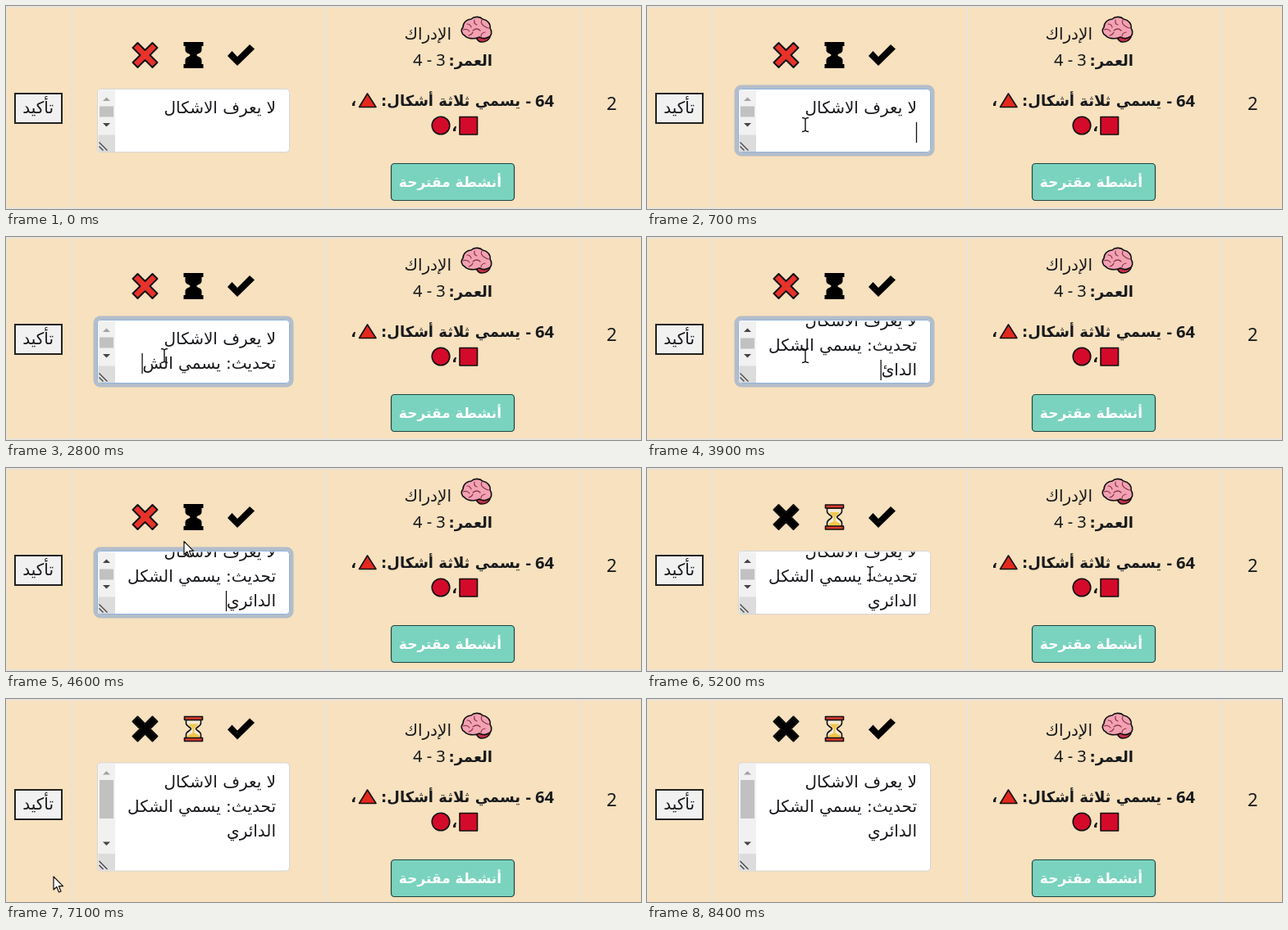
These frames come from a looping animation (774 by 248 pixels, 8500 ms). An HTML page:

```html
<!DOCTYPE html>
<html lang="ar">
<head>
<meta charset="utf-8">
<title>تحديث الملاحظة</title>
<style>
html, body { margin: 0; width: 100%; height: 100%; overflow: hidden; background: #f7e1be; }
svg { display: block; }
text { font: 20px 'Noto Sans', 'DejaVu Sans', sans-serif; fill: #17191c; white-space: pre; }
.ar { font-family: 'DejaVu Sans', sans-serif; direction: rtl; }
.bold { font-weight: bold; }
.grid { fill: none; stroke: #e9e3da; stroke-width: 2; }
.ink { stroke: #111; stroke-width: 1.6; stroke-linejoin: round; stroke-linecap: round; }
.cursor { fill: #fff; stroke: #111; stroke-width: 1.2; stroke-linejoin: round; }
</style>
</head>
<body>
<svg width="774" height="248" viewBox="0 0 774 248">
  <defs>
    <clipPath id="clip"><rect id="clipBox" x="134" width="211"/></clipPath>
  </defs>
  <rect width="774" height="248" fill="#f7e1be"/>
  <path class="grid" d="M0 1H774M0 0V248M80 0V248M390 0V248M700 0V248"/>
  <path class="grid" id="floor" d="M0 247H774"/>

  <g id="row">
    <rect x="11" y="107" width="57" height="36" fill="#f1f1f1" stroke="#222" stroke-width="2"/>
    <text class="ar" x="58" y="131">تأكيد</text>

    <g class="ink">
      <path fill="#c5304a" d="M573 38C578 36 588 35 590 38C588 42 584 44 580 44C576 44 574 41 573 38Z"/>
      <path fill="#f3a2b3" d="M559 36C555 34 554 29 557 26C557 20 562 16 567 16C571 12 578 13 581 16C587 17 591 22 590 27C593 31 592 37 588 38C584 41 579 39 577 38C571 41 562 40 559 36Z"/>
      <path fill="none" stroke="#8d3a4c" stroke-width="1.2" d="M562 22q4 0 5 4M557 29q5-2 8 2M571 17q-1 5 3 6M580 17q-2 4 2 7t7 3M569 30q5-4 9 0M564 36q4-1 5-4M579 37q0-4 5-5"/>
    </g>
    <text class="ar" x="543" y="41">الإدراك</text>
    <text class="ar bold" x="593" y="73" style="font-size:18px">العمر:</text>
    <text x="496" y="73">4 - 3</text>

    <text class="bold" x="668" y="123" text-anchor="end">- 64</text>
    <text class="ar bold" x="627" y="122" style="font-size:18px">يسمي ثلاثة أشكال:</text>
    <path class="ink" fill="#e4281d" d="M440.500 107L451 123.500H430.500Z"/>
    <text class="ar bold" x="427" y="122" style="font-size:18px">،</text>
    <rect class="ink" x="553" y="135.500" width="21.500" height="21.500" fill="#d40a2a"/>
    <text class="ar bold" x="550" y="153" style="font-size:18px">،</text>
    <circle class="ink" cx="530" cy="146" r="10.800" fill="#d40a2a"/>

    <rect x="469.500" y="192.500" width="150" height="45" rx="4" fill="#7ad3bf" stroke="#20443e" stroke-width="1.200"/>
    <text class="ar bold" x="604" y="221" style="font-size:17px;fill:#fff">أنشطة مقترحة</text>
    <text x="732" y="127" style="font-size:22px">2</text>
  </g>

  <g id="icons">
    <path id="cross" class="ink" transform="translate(169.500 0)" style="stroke-width:2"
      d="M-15-9L-9-15L0-6L9-15L15-9L6 0L15 9L9 15L0 6L-9 15L-15 9L-6 0Z"/>
    <g transform="translate(228.500 0)">
      <path id="glassDark" fill="#000" d="M-12-16H12V-11H10V-6C10-2 4-2 4 0C4 2 10 2 10 6V11H12V16H-12V11H-10V6C-10 2-4 2-4 0C-4-2-10-2-10-6V-11H-12Z"/>
      <g id="glassLit" class="ink">
        <path fill="#f5ead4" d="M-9-11V-7C-9-3-3-2-3 0C-3 2-9 3-9 7V11H9V7C9 3 3 2 3 0C3-2 9-3 9-7V-11Z"/>
        <path fill="#f2c84b" stroke="none" d="M-6-6H6C5-3 1-2 1 1V5L7 8V11H-7V8L-1 5V1C-1-2-5-3-6-6Z"/>
        <path fill="#dc3a2d" d="M-11-15H11V-11H-11ZM-11 11H11V15H-11Z"/>
      </g>
    </g>
    <path fill="#000" d="M270 1L275.500-5L282 2L297-13L303-7.500L282 13Z"/>
  </g>

  <rect id="ring" x="109" width="239" rx="6" fill="none" stroke="#b3bdca" stroke-width="5"/>
  <rect id="box" x="111.500" width="234" rx="4" fill="#fff"/>
  <rect id="track" x="112.500" width="20.500" fill="#f1f1f1"/>
  <rect id="thumb" x="114" width="17" fill="#c1c1c1"/>
  <path id="up" d="M118 2.500L122.500-2L127 2.500Z"/>
  <path id="down" fill="#444" d="M118-2.500L122.500 2L127-2.500Z"/>
  <g id="corner">
    <rect x="112.500" y="-21" width="20.500" height="20.500" fill="#dcdcdc"/>
    <path d="M113.500-12L123.500-2M113.500-7L118.500-2" stroke="#444" stroke-width="1.300"/>
  </g>
  <g clip-path="url(#clip)">
    <g id="note"></g>
    <path id="caret" d="M0-19V6" stroke="#111" stroke-width="1.300"/>
  </g>

  <path id="beam" d="M-4-8.500Q-1-8.500 0-7Q1-8.500 4-8.500M0-7V7M-4 8.500Q-1 8.500 0 7Q1 8.500 4 8.500" fill="none" stroke="#111" stroke-width="1.400"/>
  <path id="resize" class="cursor" d="M0-11L4.500-6H1.500V6H4.500L0 11L-4.500 6H-1.500V-6H-4.500Z"/>
  <path id="arrow" class="cursor" d="M0 0V16L3.800 12.500L6.500 19L9 18L6.400 11.700H11.500Z"/>
</svg>
<script>
const LOOP = 8500, STEP = 100;
const FIRST = 'لا يعرف الاشكال', SECOND = 'تحديث: يسمي الشكل ', THIRD = 'الدائري';
const CLICK_NOTE = 400, TYPE_START = 500, TYPE_STEP = 141, CLICK_GLASS = 4800;
const DRAG_START = 5500, DRAG_END = 6000, SCROLL_BACK = 6200;
const RIGHT = 329, LINE = 30, CONTENT = 194, SLACK = 47;

// time, x, y of the pointer
const PATH = [
  [100, 300, 246], [400, 193, 145], [4400, 193, 145], [4700, 229, 62],
  [4900, 229, 62], [5200, 272, 129], [5500, 128, 184.5], [6000, 128, 216],
  [6100, 150, 190], [6200, 150, 190], [6300, 58, 217], [7300, 58, 217]
];

const $ = id => document.getElementById(id);
const set = (node, attrs) => { for (const k in attrs) node.setAttribute(k, attrs[k]); };
const show = (id, on) => $(id).setAttribute('visibility', on ? 'visible' : 'hidden');
const move = (id, x, y) => $(id).setAttribute('transform', `translate(${x} ${y})`);
const mix = (a, b, p) => a + (b - a) * p;
const clamp = (v, lo, hi) => Math.max(lo, Math.min(hi, v));

const lines = [0, 1, 2].map(() => {
  const el = document.createElementNS('http://www.w3.org/2000/svg', 'text');
  set(el, { class: 'ar', x: RIGHT });
  return $('note').appendChild(el);
});

function pointerAt(t) {
  const i = PATH.findIndex(k => k[0] > t);
  if (i < 1) return null;
  const [a, b] = [PATH[i - 1], PATH[i]];
  const p = (t - a[0]) / (b[0] - a[0]);
  return { x: mix(a[1], b[1], p), y: mix(a[2], b[2], p) };
}

function heightAt(t) {
  if (t <= 5900) return mix(77, 126, clamp((t - DRAG_START) / 400, 0, 1));
  return mix(126, 132, clamp((t - 5900) / 100, 0, 1));
}

function noteLines(t) {
  const n = Math.floor((t - TYPE_START) / TYPE_STEP);
  const tail = (SECOND + THIRD).slice(0, clamp(n - 1, 0, 99));
  const wraps = tail.length > SECOND.length + 1;
  return {
    rows: wraps ? [FIRST, SECOND, tail.slice(SECOND.length)] : [FIRST, tail, ''],
    last: wraps ? 2 : n > 0 ? 1 : 0
  };
}

function drawNote(t, top, scroll, focus, { rows, last }) {
  lines.forEach((el, i) => {
    el.textContent = rows[i];
    el.setAttribute('y', top + 29.5 + LINE * i - scroll);
  });
  const width = rows[last] ? lines[last].getComputedTextLength() : 0;
  move('caret', RIGHT - width - 0.5, top + 29.5 + LINE * last - scroll);
  show('caret', focus);
}

function drawBox(top, height, scroll, focus) {
  const bottom = top + height, track = height - 63;
  const size = Math.max(13, track * height / CONTENT);
  const pos = Math.min(track - size, track * scroll / CONTENT);
  set($('box'), { y: top, height, stroke: focus ? '#8fb3dc' : '#d3d5d6' });
  set($('ring'), { y: top - 2.5, height: height + 5 });
  show('ring', focus);
  set($('track'), { y: top + 1, height: height - 2 });
  set($('thumb'), { y: top + 21 + pos, height: size });
  set($('clipBox'), { y: top + 1, height: height - 2 });
  set($('up'), { fill: scroll ? '#444' : '#a3a3a3' });
  move('up', 0, top + 12);
  move('down', 0, bottom - 33);
  move('corner', 0, bottom);
}

function drawPointer(t, top, bottom) {
  const p = pointerAt(t);
  const dragging = t >= DRAG_START && t <= DRAG_END;
  if (p && dragging) p.y = bottom + 6;
  const inside = p && p.x > 133 && p.x < 345 && p.y > top && p.y < bottom;
  const kind = !p ? '' : dragging ? 'resize' : inside ? 'beam' : 'arrow';
  for (const id of ['beam', 'resize', 'arrow']) {
    show(id, id === kind);
    if (id === kind) move(id, p.x, p.y);
  }
}

function draw(t) {
  const height = heightAt(t), grown = height - 77;
  const top = 101.5 - Math.min(grown, SLACK) / 2;
  const shift = Math.max(0, grown - SLACK) / 2;
  const focus = t >= CLICK_NOTE && t < CLICK_GLASS;
  const lit = t >= CLICK_GLASS;
  const note = noteLines(t);
  const scroll = note.last === 2 && t < SCROLL_BACK ? 22 : 0;

  move('row', 0, shift);
  move('floor', 0, shift * 2);
  move('icons', 0, top - 41.5);
  set($('cross'), { fill: lit ? '#000' : '#e8322a' });
  show('glassDark', !lit);
  show('glassLit', lit);
  drawBox(top, height, scroll, focus);
  drawNote(t, top, scroll, focus, note);
  drawPointer(t, top, top + height);
}

const start = performance.now();
function tick() {
  const t = (performance.now() - start) % LOOP;
  draw(Math.floor(t / STEP) * STEP);
  requestAnimationFrame(tick);
}
tick();
</script>
</body>
</html>
```
